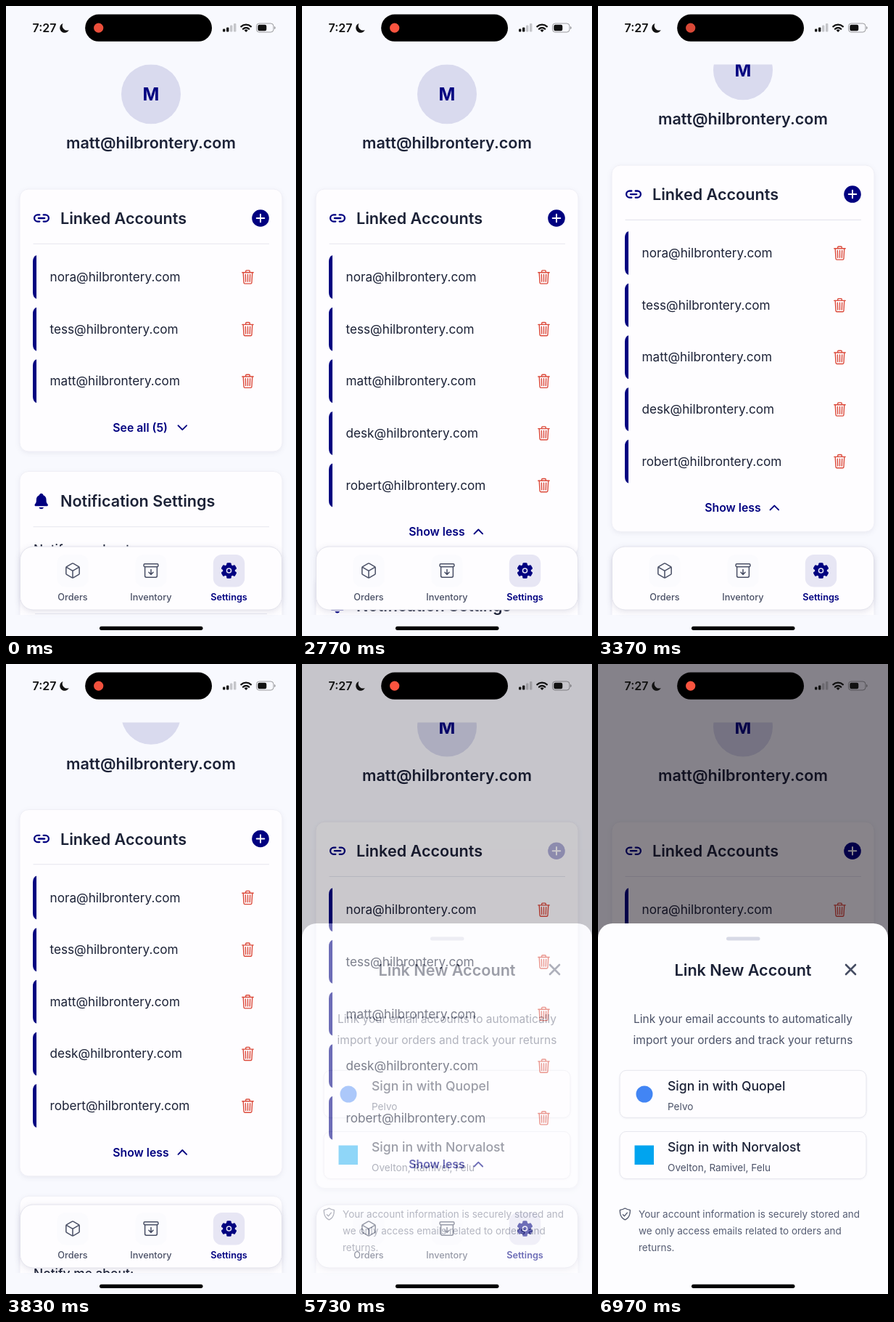
An HTML page that plays this animation: 400 by 867 pixels, repeating every 7 s.

```html
<!DOCTYPE html>
<html lang="en">
<head>
<meta charset="utf-8">
<title>Account settings</title>
<style>
html, body { margin: 0; width: 100%; height: 100%; overflow: hidden; background: #f8f9fe; }
svg { display: block; width: 100%; height: 100%; }
text { font-family: Inter, "Liberation Sans", sans-serif; fill: #1c2237; }
.mid { text-anchor: middle; }
.head { font-size: 21.6px; font-weight: 600; }
.row { font-size: 17.2px; }
.link { font-size: 15.8px; font-weight: 600; fill: #000080; }
.tab { font-size: 12.7px; font-weight: 500; fill: #4a5066; }
.on { font-weight: 600; fill: #000080; }
.body { font-size: 15.5px; fill: #4b5268; }
.btn { font-size: 17.6px; font-weight: 500; }
.small { font-size: 13.6px; fill: #4b5268; }
.note { font-size: 13.5px; fill: #565d73; }
.card { fill: #fefdff; stroke: #efeff6; filter: drop-shadow(0 2px 3px rgba(40, 40, 90, .07)); }
.choice { fill: #fefdff; stroke: #e6e6ed; filter: drop-shadow(0 1px 1px rgba(40, 40, 90, .05)); }
.line { stroke: #e5e6ee; stroke-width: 1.1; }
.icon { fill: none; stroke-linecap: round; stroke-linejoin: round; }
</style>
</head>
<body>
<svg id="stage" viewBox="0 0 400 867" preserveAspectRatio="none"></svg>
<script>
const NAVY = '#000080', GREY = '#4a5066', TILE = '#e7e6f4';
const LOOP = 7000, PITCH = 71.65, GROW = 2 * PITCH;
const DOMAIN = '@hilbrontery.com';

const text = (x, y, cls, str) => `<text x="${x}" y="${y}" class="${cls}">${str}</text>`;
const rect = (x, y, w, h, r, attrs) =>
  `<rect x="${x}" y="${y}" width="${w}" height="${h}" rx="${r}" ${attrs}/>`;
const circle = (x, y, r, attrs) => `<circle cx="${x}" cy="${y}" r="${r}" ${attrs}/>`;
const stroke = (d, color, width) =>
  `<path class="icon" d="${d}" stroke="${color}" stroke-width="${width}"/>`;
// Icons are drawn on a 512 grid and centred on (x, y).
const place = (x, y, size, inner) =>
  `<g transform="translate(${x} ${y}) scale(${size / 512}) translate(-256 -256)">${inner}</g>`;

const trash = stroke('M112 112l20 320c1 18 14 32 32 32h184c18 0 31-14 32-32l20-320M80 112h352' +
  'M192 112V72a24 24 0 0124-24h80a24 24 0 0124 24v40M256 176v224M184 176l8 224M328 176l-8 224', '#dc4a3b', 32);
const chain = stroke('M200 352H144a96 96 0 010-192h56M312 160h56a96 96 0 010 192h-56M169 256h176', NAVY, 48);
const bell = `<path fill="${NAVY}" d="M256 32c-28 0-52 20-60 49-56 23-84 68-84 136 0 86-20 96-42 126
  -20 28 0 57 32 57h308c32 0 52-29 32-57-22-30-42-40-42-126 0-68-28-113-84-136-8-29-32-49-60-49z
  M186 432h140q-20 48-70 48t-70-48z"/>`;
const cube = stroke('M448 341V171a32 32 0 00-16-28L280 55a48 48 0 00-48 0L80 143a32 32 0 00-16 28v170' +
  'a32 32 0 0016 28l152 88a48 48 0 0048 0l152-88a32 32 0 0016-28zM69 154l187 110 187-110M256 464V264', GREY, 32);
const box = stroke('M80 152v256a40 40 0 0040 40h272a40 40 0 0040-40V152M320 304l-64 64-64-64M256 346V224', GREY, 32) +
  rect(48, 64, 416, 80, 28, `fill="none" stroke="${GREY}" stroke-width="32"`);
const gear = [0, 60, 120, 180, 240, 300].map(a =>
    rect(187, 28, 138, 140, 32, `fill="${NAVY}" transform="rotate(${a} 256 256)"`)).join('') +
  circle(256, 256, 176, `fill="${NAVY}"`) +
  circle(256, 256, 64, `fill="none" stroke="${TILE}" stroke-width="32"`);
const shield = stroke('M256 48c-60 40-110 54-182 60-12 170 40 290 182 356 142-66 194-186 182-356' +
  '-72-6-122-20-182-60zM176 272l56 58 104-122', '#4b5268', 34);

const row = (name, i) => `<g class="${i > 2 ? 'extra' : ''}" transform="translate(0 ${i * PITCH})">
  <path fill="${NAVY}" d="M42 343q-5 2-5 9v42q0 7 5 9z"/>
  ${text(60.5, 379, 'row', name + DOMAIN)}${place(333.5, 373, 22.4, trash)}</g>`;

const content = `
  ${circle(200, 121.3, 41, 'fill="#d9daee"')}
  <text x="200" y="130.4" class="mid" style="font-size:24.5px;font-weight:700;fill:${NAVY}">M</text>
  ${text(200, 196, 'head mid', 'matt' + DOMAIN)}
  ${rect(19, 252, 362, 361, 12, 'class="card" id="list"')}
  ${place(49, 292, 24.4, chain)}${text(75, 300, 'head', 'Linked Accounts')}
  <g id="plus">${circle(351, 292, 11.8, `fill="${NAVY}"`)}${stroke('M345.7 292h10.6M351 286.7v10.6', '#fff', 2)}</g>
  <path class="line" d="M37.5 327.3h325.5"/>
  ${['nora', 'tess', 'matt', 'desk', 'robert'].map(row).join('')}
  <g id="toggle">${text(147.3, 585.8, 'link', '')}<path class="icon" stroke="${NAVY}" stroke-width="1.9"/></g>
  <g id="notify">
    ${rect(19, 640.5, 362, 420, 12, 'class="card"')}
    ${place(48.7, 681.5, 24.4, bell)}${text(75, 689.3, 'head', 'Notification Settings')}
    <path class="line" d="M37.5 716.7h325.5M40 836.5h320"/>
    <text x="38" y="753.5" style="font-size:17.4px;font-weight:500">Notify me about:</text>
  </g>`;

const tab = (x, icon, label, on) =>
  rect(x - 21.7, 755, 43.4, 44.5, 12, `fill="${on ? TILE : '#fbfbfe'}"`) +
  place(x, 777, 24.4, icon) + text(x, 817.6, 'mid tab ' + (on ? 'on' : ''), label);

const nav = rect(19.5, 744, 361, 87, 18,
    'fill="#fefdff" stroke="#e3e3ec" style="filter:drop-shadow(0 2px 4px rgba(40,40,90,.12))"') +
  tab(92, cube, 'Orders') + tab(200, box, 'Inventory') + tab(307.5, gear, 'Settings', true);

const button = (y, mark, title, sub) =>
  rect(30, y, 340, 65, 9, 'class="choice"') + mark +
  text(96, y + 27.7, 'btn', 'Sign in with ' + title) + text(96, y + 54.8, 'small', sub);

const modal = `
  <rect width="400" height="867" fill="#08000c" fill-opacity=".48"/>
  ${rect(0, 357, 400, 540, 20, 'fill="#fdfdff"')}
  ${rect(177, 375.6, 46.5, 5, 2.5, 'fill="#d7d9e6"')}
  ${text(200, 428.7, 'head mid', 'Link New Account')}
  ${stroke('M342 414l13 13M355 414l-13 13', '#464d63', 2.6)}
  ${text(200, 494, 'body mid', 'Link your email accounts to automatically')}
  ${text(200, 522.5, 'body mid', 'import your orders and track your returns')}
  ${button(559.3, circle(64, 592, 11.5, 'fill="#4285f4"'), 'Quopel', 'Pelvo')}
  ${button(643.4, rect(50.5, 662.5, 26.5, 26.5, 0, 'fill="#00a4ef"'), 'Norvalost', 'Ovelton, Ramivel, Felu')}
  ${place(37.3, 757, 19.5, shield)}
  ${['Your account information is securely stored and', 'we only access emails related to orders and', 'returns.']
    .map((s, i) => text(56, 762.4 + i * 22.8, 'note', s)).join('')}`;

const status = `
  <text x="36.5" y="35.6" style="font-size:16px;font-weight:600;fill:#111">7:27</text>
  <path fill="#111" d="M78.5 24a6.6 6.6 0 1 0 8.3 9a6.5 6.5 0 0 1-8.3-9z"/>
  ${rect(109.2, 11.6, 174.8, 37.2, 18.6, '')}
  ${circle(127.7, 30.2, 6.6, 'fill="#fd5540" id="rec"')}
  ${[4, 6, 9, 11.5].map((h, i) =>
    rect(299 + i * 5, 35.6 - h, 3.4, h, 1, `fill="#111" fill-opacity="${i < 2 ? 1 : .22}"`)).join('')}
  ${stroke('M324.3 28.3a10 10 0 0 1 13.6 0M327 31.6a6 6 0 0 1 8.2 0', '#111', 2.3)}
  <path fill="#111" d="M331.1 36l-2.5-2.5a3.6 3.6 0 0 1 5 0z"/>
  ${rect(345.5, 24, 23.5, 12, 3.8, 'fill="none" stroke="#111" stroke-opacity=".4"')}
  ${rect(347.3, 25.8, 12, 8.4, 2.2, 'fill="#111"')}
  <path fill="#111" fill-opacity=".45" d="M370.2 28v4q1.5-.6 1.5-2t-1.5-2z"/>
  ${rect(129, 853.7, 142.5, 5.2, 2.6, '')}`;

const stage = document.getElementById('stage');
stage.innerHTML = `
  <clipPath id="view"><rect y="80.5" width="400" height="757.5"/></clipPath>
  <rect width="400" height="867" fill="#f8f9fe"/>
  <g clip-path="url(#view)"><g id="scroll">${content}</g></g>
  ${nav}<g id="modal">${modal}</g>${status}`;

const $ = sel => stage.querySelector(sel);
const scroll = $('#scroll'), list = $('#list'), toggle = $('#toggle'), notify = $('#notify');
const label = $('#toggle text'), chevron = $('#toggle path');
const plus = $('#plus'), sheet = $('#modal'), rec = $('#rec');
const extras = stage.querySelectorAll('.extra');

const ease = (t, from, to) => {
  const u = Math.min(1, Math.max(0, (t - from) / (to - from)));
  return u * u * (3 - 2 * u);
};
const shift = (el, y) => el.setAttribute('transform', `translate(0 ${y})`);
const fade = (el, a) => el.setAttribute('opacity', a);

function draw(t) {
  const open = ease(t, 1650, 1950);
  const expanded = t >= 1650;
  list.setAttribute('height', 361 + GROW * open);
  extras.forEach(el => fade(el, open));
  shift(toggle, GROW * open);
  shift(notify, GROW * open);
  label.textContent = expanded ? 'Show less' : 'See all (5)';
  chevron.setAttribute('d', expanded ? 'M237.5 583l5.8-5.8 5.8 5.8' : 'M237.5 577.3l5.8 5.8 5.8-5.8');
  fade(toggle, 1 - .7 * (ease(t, 1520, 1620) - ease(t, 1650, 1900)));

  shift(scroll, -51.5 * ease(t, 2970, 3645) + 16.7 * ease(t, 4450, 4972));

  fade(plus, 1 - .7 * (ease(t, 5380, 5530) - ease(t, 5730, 6000)));
  const shown = ease(t, 5595, 5895);
  fade(sheet, shown);
  sheet.setAttribute('visibility', shown ? 'visible' : 'hidden');
  fade(rec, .93 - .07 * Math.sin(2 * Math.PI * t / 1500));
}

const start = performance.now();
function tick() {
  draw((performance.now() - start) % LOOP);
  requestAnimationFrame(tick);
}
tick();
</script>
</body>
</html>
```
